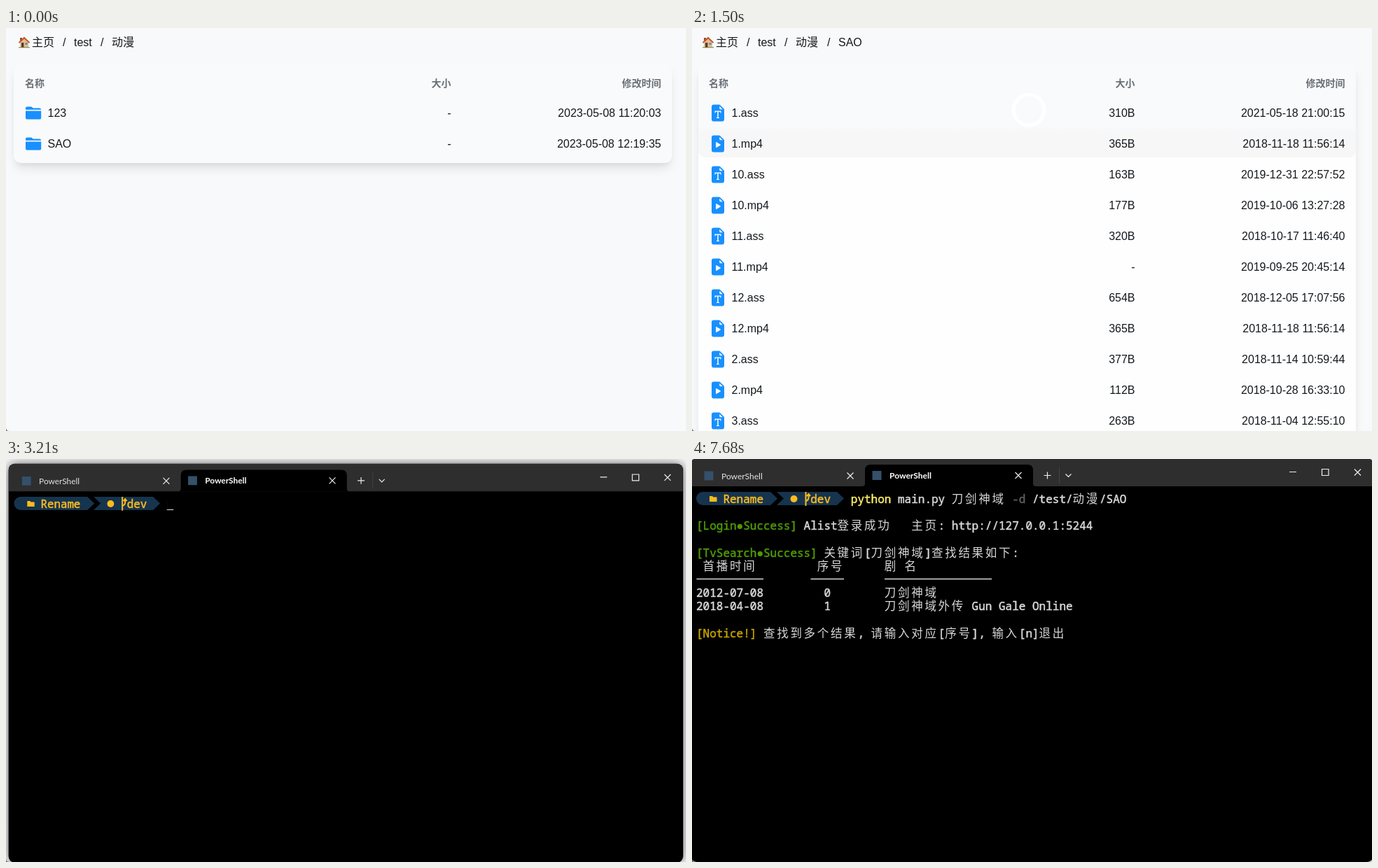
Write an HTML page that moves like this. It is 971x576 px and loops after 8 s.

```html
<!DOCTYPE html>
<html lang="zh">
<head>
<meta charset="utf-8">
<title>Rename session</title>
<style>
html, body { margin: 0; width: 100%; height: 100%; overflow: hidden; background: #f8f9fb; }
#stage { position: fixed; inset: 0; overflow: hidden; contain: strict; }
.view, .view > svg, .card, #term, #screen { position: absolute; }
.view { inset: 0; overflow: hidden; background: #f8f9fb; }
.view > svg { left: 0; top: 0; }
.card {
  left: 11px; top: 52px; width: 940px; border-radius: 10px; background: #f9fafc;
  box-shadow: 0 10px 15px -3px rgba(0,0,0,.1), 0 4px 6px -2px rgba(0,0,0,.05);
}
#home .card { height: 141px; }
#loading .card { height: 129px; }
#list .card { left: 9px; width: 939px; height: 600px; background: #fefefe; }

text { white-space: pre; }
.view text { font: 16px "Liberation Sans", "Noto Sans CJK SC", "Noto Sans CJK", sans-serif; fill: #14191d; }
.view .head { font-size: 14px; font-weight: 700; fill: #687076; }
.end { text-anchor: end; }

#loading { animation: show-loading 8s step-end infinite; }
#list { animation: show-list 8s step-end infinite; }
@keyframes show-loading { 0% { visibility: hidden } 12%, to { visibility: visible } }
@keyframes show-list { 0% { visibility: hidden } 16.125%, to { visibility: visible } }
.spin { transform-origin: 481px 117px; animation: spin .6667s linear infinite; }
@keyframes spin { to { transform: rotate(360deg) } }

#list .row { transform-box: fill-box; transform-origin: center; animation: row-in 8s linear infinite; }
@keyframes row-in {
  0%, 16.125% { opacity: 0; transform: scale(.95) }
  16.5% { opacity: .2; transform: scale(.9535) }
  18.6%, to { opacity: 1; transform: none }
}

#term {
  left: -2px; top: -1px; width: 975px; height: 577px; overflow: hidden;
  border-radius: 9px; background: #000; transform-origin: 469px 640px;
  box-shadow: 0 0 14px rgba(0,0,0,.55), 0 0 50px rgba(0,0,0,.12);
  animation: pop 8s step-end infinite;
}
@keyframes pop {
  0% { visibility: hidden; transform: scale(.612) }
  39% { visibility: visible; transform: scale(.612) }
  39.375% { transform: scale(.878) }
  39.75% { transform: scale(.962) }
  40.125% { transform: scale(.988) }
  40.5% { transform: scale(.996) }
  40.875%, to { visibility: visible; transform: none }
}

#screen { left: 2px; top: 1px; overflow: visible; animation: session 8s step-end infinite; }
@keyframes session {
  0% { --col: 23; --row: 0; --cursor: 1; --typed: 0; --ghost: 0; --rest: 0; --login: 0; --result: 0 }
  44.25% { --cursor: 0 }
  50.625% { --cursor: 1 }
  56.25% { --typed: 1; --col: 24; --ghost: 1 }
  58.5% { --typed: 2; --col: 25 }
  61.125% { --typed: 3; --col: 26 }
  64.125% { --typed: 4; --col: 27 }
  66.75% { --typed: 5; --col: 28 }
  68.625% { --typed: 6; --col: 29 }
  74.25% { --col: 64; --ghost: 0; --rest: 1 }
  80.625% { --cursor: 0 }
  87% { --cursor: 1 }
  89.25% { --col: 0; --row: 1 }
  92.625% { --row: 3; --login: 1 }
  94.5% { --col: 56; --row: 10; --result: 1 }
  96% { --cursor: 0 }
  to { --col: 56; --row: 10; --cursor: 0; --typed: 6; --ghost: 0; --rest: 1; --login: 1; --result: 1 }
}
#cursor {
  fill: #ccc; opacity: var(--cursor);
  transform: translate(calc(var(--col) * 9.6px), calc(var(--row) * 19.2px));
}
#typed { clip-path: inset(0 calc((6 - var(--typed)) * 9.6px) 0 0); }
#ghost { opacity: var(--ghost); clip-path: inset(0 0 0 calc(var(--typed) * 9.6px)); }
#rest { opacity: var(--rest); }
#login { opacity: var(--login); }
#result { opacity: var(--result); }

.mono, .wide { color: #d8d8d8; fill: currentColor; }
.mono { font: 16px "Noto Sans Mono", "DejaVu Sans Mono", monospace; stroke: currentColor; stroke-width: .5; }
.wide { font: 16.5px "Noto Sans CJK SC", "Noto Sans CJK", sans-serif; letter-spacing: 2.7px; }
.prompt { color: #fdbb1c; fill: currentColor; }
.command { color: #f9ee6a; }
.dim { color: #5c5c5c; }
.hint { color: #484848; }
.ok { color: #4e9a06; }
.note { color: #c4a000; }
.tab { font: 12px Lato, "Open Sans", sans-serif; fill: #e4e4e4; }
.active { font-weight: 700; fill: #fff; }
.stroke { fill: none; stroke: #eee; stroke-width: 1.2; }
</style>
</head>
<body>
<div id="stage">
<svg width="0" height="0" style="position:absolute">
  <defs>
    <linearGradient id="tint" x1="0" y1="0" x2="0" y2="1">
      <stop offset=".66" stop-color="#f9fafc"/>
      <stop offset=".74" stop-color="#f7f7f8"/>
    </linearGradient>
    <g id="house">
      <path d="M20 20v8h12v-8l-6-6z" fill="#e3bd94"/>
      <path d="M20 14h3v5h-3z" fill="#8d4f35"/>
      <path d="M26 12.5l8.3 8-1.4 1.3-6.9-6.4-6.9 6.4-1.4-1.3z" fill="#c35a2c"/>
      <path d="M22 21h3.4v7H22z" fill="#60382a"/>
      <path d="M27.5 21h3v3h-3z" fill="#5b8fb5"/>
      <path d="M18 28.3h16v-1H18z" fill="#68843f"/>
    </g>
    <path id="folder" fill="#1890ff" d="M28 116.8v-2.3a2 2 0 0 1 2-2h6.5l2.2 2H48a2 2 0 0 1 2 2v.3zM28 118.6h22.2v9.9a2 2 0 0 1-2 2H30a2 2 0 0 1-2-2z"/>
    <path id="file" fill="#1890ff" d="M9.3 0H4a2 2 0 0 0-2 2v12a2 2 0 0 0 2 2h8a2 2 0 0 0 2-2V4.7a1 1 0 0 0-.3-.7L10 .3A1 1 0 0 0 9.3 0zM9.5 3.5v-2l3 3h-2a1 1 0 0 1-1-1z"/>
    <g id="ass"><use href="#file"/><path fill="#fff" d="M11 6H5v2h.5c.2-1.1.4-1.2 2-1.24v5.1c0 .46-.1.57-.9.64v.5h2.8v-.5c-.8-.07-.9-.18-.9-.64v-5.1c1.6.04 1.8.14 2 1.24h.5z"/></g>
    <g id="mp4"><use href="#file"/><path fill="#fff" d="M6 6.9v4.2a.5.5 0 0 0 .76.43l3.5-2.1a.5.5 0 0 0 0-.86l-3.5-2.1A.5.5 0 0 0 6 6.9z"/></g>
    <path id="cross" class="stroke" d="M-4.5-4.5l9 9M4.5-4.5l-9 9"/>
  </defs>
</svg>

<div id="home" class="view"><div class="card"></div><svg width="971" height="576"></svg></div>
<div id="loading" class="view">
  <div class="card"></div>
  <svg width="971" height="576">
    <g fill="none" stroke-width="4.5">
      <circle cx="481" cy="117" r="21.8" stroke="#e6e8eb"/>
      <path class="spin" d="M465.6 101.6A21.8 21.8 0 0 1 496.4 132.4" stroke="#1890ff"/>
    </g>
  </svg>
</div>
<div id="list" class="view">
  <div class="card"></div>
  <svg width="971" height="576">
    <rect x="9" y="52" width="939" height="133" rx="10" fill="url(#tint)"/>
    <circle cx="481" cy="117" r="21.8" fill="none" stroke="#fff" stroke-width="5"/>
  </svg>
</div>

<div id="term">
  <svg id="screen" width="971" height="576">
    <path d="M-2-1h976v40H-2z" fill="#2e2e2e"/>
    <path d="M243 39q4 0 4-4V16q0-8 8-8h224q8 0 8 8v19q0 4 4 4z"/>
    <path d="M17.5 17.5h13v13h-13zM257.5 17h13v13h-13z" fill="#34506b"/>
    <text class="tab" x="42" y="28.5">PowerShell</text>
    <text class="tab active" x="282" y="28">PowerShell</text>
    <use href="#cross" x="226" y="24"/><use href="#cross" x="466" y="23.5"/>
    <use href="#cross" x="950.5" y="19"/>
    <path class="stroke" d="M502.5 23.5h10M507.5 18.5v10M533.5 21.5l4 4 4-4M853 18.5h10M899.5 14.5h9.500v9h-9.500z"/>
    <path d="M524.5 12v23" stroke="#444"/>
    <path fill="#16344e" d="M15.500 47H112l10 9.500-10 9.500H15.500a9.500 9.500 0 0 1 0-19zM121 47h86l10 9.500-10 9.500h-86l10-9.500z"/>
    <g class="prompt">
      <path d="M25 53h4l1.500 1.500H35.500V61H25z"/>
      <circle cx="145.5" cy="57" r="5"/>
    </g>
    <path d="M162.500 47v20M162.500 60q4-1 4-5v-4M164 53l2.500-3 2.500 3" fill="none" stroke="#fdbb1c" stroke-width="2"/>
    <g id="prompt"></g>
    <g id="ghost"></g><g id="typed"></g><g id="rest"></g>
    <g id="login"></g>
    <g id="result"><path d="M6.500 171.500h95.500M169.500 171.500h47.500M275 171.500h153" stroke="#d8d8d8" stroke-width="1.5"/></g>
    <rect id="cursor" x="6" y="65" width="9.6" height="1.2"/>
  </svg>
</div>
</div>

<script>
const label = (x, y, text, cls = '') => `<text x="${x}" y="${y}" class="${cls}">${text}</text>`;
const append = (selector, markup) =>
  document.querySelector(selector).insertAdjacentHTML('beforeend', markup);

// File browser
const corner = '<path d="M0 571q0 5 5 5H0z" fill="#777"/>';
const crumbs = [['主页', 37], ['/', 81], ['test', 97], ['/', 135], ['动漫', 151], ['/', 196], ['SAO', 212]];
const trail = count => '<use href="#house"/>' +
  crumbs.slice(0, count).map(([text, x]) => label(x, 26, text)).join('');
const header = label(27, 84, '名称', 'head') + label(635.5, 84, '大小', 'head end') +
  label(935.5, 84, '修改时间', 'head end');

function row(index, name, size, time) {
  const y = 44 * index;
  const type = name.split('.')[1];
  const icon = type
    ? `<use href="#${type}" transform="translate(28 ${109.5 + y}) scale(1.5)"/>`
    : `<use href="#folder" y="${y}"/>`;
  return `<g class="row">${icon}${label(59.5, 127 + y, name)}` +
    `${label(635.5, 127 + y, size, 'end')}${label(935.5, 127 + y, time, 'end')}</g>`;
}

const rows = lines => lines.map((line, i) => row(i, ...line.split('|'))).join('');
const folders = ['123|-|2023-05-08 11:20:03', 'SAO|-|2023-05-08 12:19:35'];
const files = [
  '1.ass|310B|2021-05-18 21:00:15', '1.mp4|365B|2018-11-18 11:56:14',
  '10.ass|163B|2019-12-31 22:57:52', '10.mp4|177B|2019-10-06 13:27:28',
  '11.ass|320B|2018-10-17 11:46:40', '11.mp4|-|2019-09-25 20:45:14',
  '12.ass|654B|2018-12-05 17:07:56', '12.mp4|365B|2018-11-18 11:56:14',
  '2.ass|377B|2018-11-14 10:59:44', '2.mp4|112B|2018-10-28 16:33:10',
  '3.ass|263B|2018-11-04 12:55:10',
];
append('#home svg', trail(5) + header + rows(folders) + corner);
append('#loading svg', trail(7) + corner);
append('#list svg',
  `<g transform="translate(-3 0)">${trail(7)}${header}${rows(files)}</g>${corner}`);

// Terminal: wide characters take two cells of the grid
function print(target, col, line, text, color = '') {
  for (const run of text.match(/[\u2e80-\uffff]+|[^\u2e80-\uffff]+/g)) {
    const wide = run[0] >= '\u2e80';
    append(target, label((6 + col * 9.6).toFixed(1), (62.8 + line * 19.2).toFixed(1), run,
      `${wide ? 'wide' : 'mono'} ${color}`));
    col += run.length * (wide ? 2 : 1);
  }
}

print('#prompt', 4, 0, 'Rename', 'prompt');
print('#prompt', 17, 0, 'dev', 'prompt');
print('#ghost', 23, 0, 'python main.py 刀剑神域 -d /test/动漫/SAO', 'hint');
print('#typed', 23, 0, 'python', 'command');
print('#rest', 30, 0, 'main.py 刀剑神域');
print('#rest', 47, 0, '-d', 'dim');
print('#rest', 50, 0, '/test/动漫/SAO');

print('#login', 0, 2, '[Login●Success]', 'ok');
print('#login', 16, 2, 'Alist登录成功   主页: http://127.0.0.1:5244');

print('#result', 0, 4, '[TvSearch●Success]', 'ok');
print('#result', 19, 4, '关键词[刀剑神域]查找结果如下:');
print('#result', 1, 5, '首播时间');
print('#result', 18, 5, '序号');
print('#result', 28, 5, '剧');
print('#result', 31, 5, '名');
[['2012-07-08', '刀剑神域'], ['2018-04-08', '刀剑神域外传 Gun Gale Online']].forEach(([date, title], i) => {
  print('#result', 0, 7 + i, date);
  print('#result', 19, 7 + i, String(i));
  print('#result', 28, 7 + i, title);
});
print('#result', 0, 10, '[Notice!]', 'note');
print('#result', 10, 10, '查找到多个结果, 请输入对应[序号], 输入[n]退出');
</script>
</body>
</html>
```
